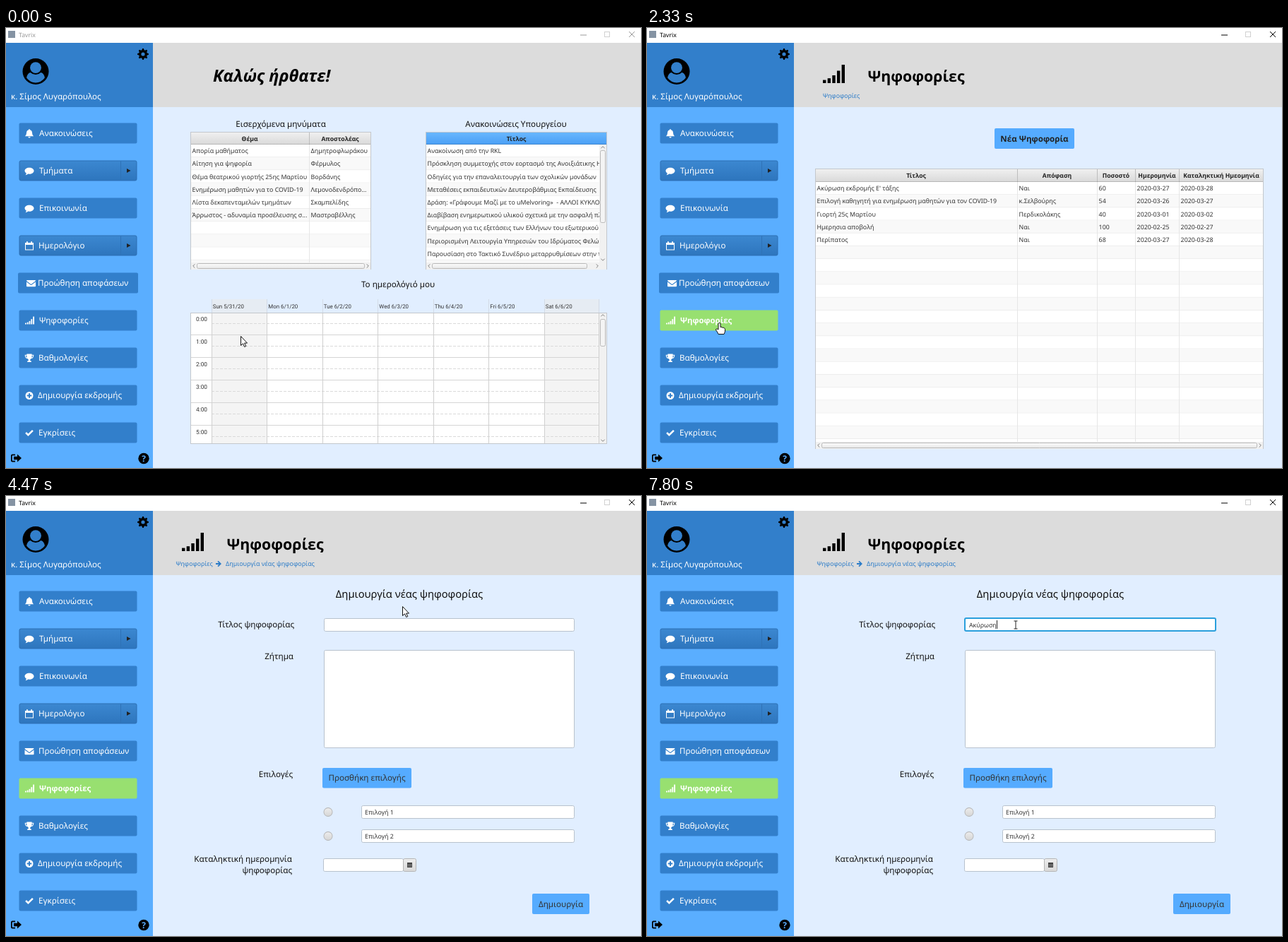
An HTML page with a canvas that plays this animation: 899 by 623 pixels, repeating every 8 s.

```html
<!DOCTYPE html>
<html lang="el">
<head>
<meta charset="utf-8">
<title>Tavrix</title>
<style>
html, body { margin: 0; width: 100%; height: 100%; overflow: hidden; background: #e1eeff; }
canvas { display: block; }
</style>
</head>
<body>
<canvas id="stage" width="899" height="623"></canvas>
<script>
const ctx = document.getElementById('stage').getContext('2d');
const LOOP = 8000, ROW = 18.2;
const BLUE = '#327fcb', SKY = '#5aaeff', PALE = '#e1eeff', SMALL = 8.8, LABEL = 11.6;
const SANS = '"Noto Sans", "Open Sans", sans-serif', ROBOTO = 'Roboto, sans-serif';

const ICONS = {
  bell: 'M0-6.5Q.8-6.5 .8-5.3Q4-4.5 4-1Q4 2.2 6 3.8H-6Q-4 2.2-4-1Q-4-4.5-.8-5.3Q-.8-6.5 0-6.5ZM-1.6 4.5H1.6Q1.4 6 0 6T-1.6 4.5Z',
  chat: 'M0-4.8C3.6-4.8 6.5-2.8 6.5-.3S3.6 4.2 0 4.2Q-.8 4.2-1.6 4.1Q-3.4 5.8-5.5 5.8Q-4.2 4.6-4.2 3.3Q-6.5 2-6.5-.3C-6.5-2.8-3.6-4.8 0-4.8Z',
  calendar: 'M-6-4.5H6V6H-6ZM-5-1.5V5H5V-1.5ZM-4-6.3H-2.2V-4.5H-4ZM2.2-6.3H4V-4.5H2.2Z',
  mail: 'M-6.5-3.6Q-6.5-4.6-5.5-4.6H5.5Q6.5-4.6 6.5-3.6L0 1.4ZM-6.5-1.9L0 2.8L6.5-1.9V4Q6.5 4.8 5.6 4.8H-5.6Q-6.5 4.8-6.5 4Z',
  trophy: 'M-3.6-6H3.6V-4.8H6.3Q6.3 .2 2.6 .6Q1.2 2 1 3.2Q3 3.6 3 5.6H-3Q-3 3.6-1 3.2Q-1.2 2-2.6 .6Q-6.3 .2-6.3-4.8H-3.6ZM-5.2-3.8Q-5-1.3-3.3-.6Q-3.7-2-3.6-3.8ZM5.2-3.8Q5-1.3 3.3-.6Q3.7-2 3.6-3.8Z',
  plus: 'M-5.5 0A5.5 5.5 0 1 1 5.5 0A5.5 5.5 0 1 1-5.5 0ZM-3.3-1V1H-1V3.3H1V1H3.3V-1H1V-3.3H-1V-1Z',
  check: 'M-5.8 .4L-4-1.5L-1.6 .9L4-4.6L5.8-2.8L-1.6 4.6Z',
  exit: 'M-1.5-5.5H-5.5Q-7.5-5.5-7.5-3.5V3.5Q-7.5 5.5-5.5 5.5H-1.5V3.8H-5Q-5.8 3.8-5.8 3V-3Q-5.8-3.8-5-3.8H-1.5ZM1.5-5.5L7.5 0L1.5 5.5V2.3H-3.5V-2.3H1.5Z',
  next: 'M-4-1H.5L-1.6-3L-.3-4.2L4 0L-.3 4.2L-1.6 3L.5 1H-4Z',
  shoulders: 'M12.9 9.1Q12 2.4 7.3 1.4Q4.2 4.6 0 4.6T-7.3 1.4Q-12 2.4-12.9 9.1Q-8 15.9 0 15.9T12.9 9.1Z',
  arrow: 'M0 0V13L3 10.3L5.2 15L7.3 14L5.1 9.6H9Z',
  hand: 'M-1.5 9.5V1.5Q-1.5 0 0 0T1.5 1.5V6Q4 5.6 4.2 6.7Q6.6 6.3 6.8 7.6Q8 7.5 8 9V11.5Q8 13 6.5 16H-1.5Q-2 14-4.7 10.5Q-5.6 9-4.4 8.6Q-3 8.3-1.5 9.5Z'
};
for (const k in ICONS) ICONS[k] = new Path2D(ICONS[k]);

const NAV = [
  ['Ανακοινώσεις', 'bell', 47], ['Τμήματα', 'chat', 47, true], ['Επικοινωνία', 'chat', 47],
  ['Ημερολόγιο', 'calendar', 46, true], ['Προώθηση αποφάσεων', 'mail', 46], ['Ψηφοφορίες', 'bars', 47],
  ['Βαθμολογίες', 'trophy', 46], ['Δημιουργία εκδρομής', 'plus', 45], ['Εγκρίσεις', 'check', 46]
];
const INBOX = [
  ['Απορία μαθήματος', 'Δημητροφλωράκου'], ['Αίτηση για ψηφορία', 'Φέρμυλος'],
  ['Θέμα θεατρικού γιορτής 25ης Μαρτίου', 'Βορδάνης'],
  ['Ενημέρωση μαθητών για το COVID-19', 'Λεμονοδενδρόπο...'],
  ['Λίστα δεκαπενταμελών τμημάτων', 'Σκαμπελίδης'],
  ['Άρρωστος - αδυναμία προσέλευσης σ...', 'Μαστραβέλλης']
];
const NEWS = [
  'Ανακοίνωση από την RKL', 'Πρόσκληση συμμετοχής στον εορτασμό της Ανοιξιάτικης Η.',
  'Οδηγίες για την επαναλειτουργία των σχολικών μονάδων',
  'Μεταθέσεις εκπαιδευτικών Δευτεροβάθμιας Εκπαίδευσης',
  'Δράση: «Γράφουμε Μαζί με το uMelvoring»  - ΑΛΛΟΙ ΚΥΚΛΟΙ',
  'Διαβίβαση ενημερωτικού υλικού σχετικά με την ασφαλή πλοήγηση',
  'Ενημέρωση για τις εξετάσεις των Ελλήνων του εξωτερικού',
  'Περιορισμένη Λειτουργία Υπηρεσιών του Ιδρύματος Φελώ.',
  'Παρουσίαση στο Τακτικό Συνέδριο μεταρρυθμίσεων στην τάξη'
].map(s => [s]);
const VOTES = [
  ['Ακύρωση εκδρομής Ε\' τάξης', 'Ναι', '60', '2020-03-27', '2020-03-28'],
  ['Επιλογή καθηγητή για ενημέρωση μαθητών για τον COVID-19', 'κ.Σελβούρης', '54', '2020-03-26', '2020-03-27'],
  ['Γιορτή 25ς Μαρτίου', 'Περδικολάκης', '40', '2020-03-01', '2020-03-02'],
  ['Ημερησια αποβολή', 'Ναι', '100', '2020-02-25', '2020-02-27'],
  ['Περίπατος', 'Ναι', '68', '2020-03-27', '2020-03-28']
];
const DAYS = ['Sun 5/31/20', 'Mon 6/1/20', 'Tue 6/2/20', 'Wed 6/3/20', 'Thu 6/4/20', 'Fri 6/5/20', 'Sat 6/6/20'];

// start, end, steps, then from / control / to points
const MOVES = [
  [60, 470, 6, 332, 436, 190, 365, 102, 425],
  [710, 810, 2, 102, 425, 102, 421, 102, 417],
  [2640, 3270, 9, 102, 417, 725, 150, 561, 161],
  [3440, 3530, 2, 561, 161, 561, 158, 561, 156],
  [4850, 5020, 3, 561, 156, 540, 166, 522, 179],
  [5170, 5250, 2, 522, 179, 522, 181, 522, 182]
];
const KEYS = [6400, 6790, 7190, 7410, 7560, 7720, 7800];

function rect(x, y, w, h, fill) {
  ctx.fillStyle = fill;
  ctx.fillRect(x, y, w, h);
}
function box(x, y, w, h, fill, line, r = 2, lw = 1) {
  ctx.beginPath();
  ctx.roundRect(x, y, w, h, r);
  ctx.fillStyle = fill;
  ctx.fill();
  if (line) {
    ctx.strokeStyle = line;
    ctx.lineWidth = lw;
    ctx.stroke();
  }
}
function disc(x, y, r, fill) {
  ctx.beginPath();
  ctx.arc(x, y, r, 0, 7);
  ctx.fillStyle = fill;
  ctx.fill();
}
function line(pts, color, w = 1) {
  ctx.beginPath();
  for (let i = 0; i < pts.length; i += 2) ctx.lineTo(pts[i], pts[i + 1]);
  ctx.strokeStyle = color;
  ctx.lineWidth = w;
  ctx.stroke();
}
function grad(y, h, a, b) {
  const g = ctx.createLinearGradient(0, y, 0, y + h);
  g.addColorStop(0, a);
  g.addColorStop(1, b);
  return g;
}
function text(s, x, y, size, color = '#111', align = 'left', style = '', font = SANS) {
  ctx.font = `${style} ${size}px ${font}`;
  ctx.textAlign = align;
  ctx.fillStyle = color;
  ctx.fillText(s, x, y + size * 0.36);
}
function icon(name, x, y, fill, outline) {
  ctx.save();
  ctx.translate(x, y);
  ctx.fillStyle = fill;
  ctx.fill(ICONS[name], 'evenodd');
  if (outline) {
    ctx.strokeStyle = outline;
    ctx.lineWidth = 1;
    ctx.stroke(ICONS[name]);
  }
  ctx.restore();
}
function bars(x, base, k, color) {
  [4.4, 6.8, 11, 17.5, 26].forEach((h, i) => rect(x + i * 6.65 * k, base - h * k, 4.4 * k, h * k, color));
}
function gear(x, y) {
  ctx.beginPath();
  for (let i = 0; i < 32; i++) {
    const a = (i - 1.5) * Math.PI / 16, r = i % 4 === 1 || i % 4 === 2 ? 8 : 5.9;
    ctx.lineTo(x + r * Math.cos(a), y + r * Math.sin(a));
  }
  ctx.closePath();
  ctx.fillStyle = '#000';
  ctx.fill();
  disc(x, y, 2.6, BLUE);
}

function chevron(x, y, dx, dy) {
  const k = 2.6;
  line([x - dx * 1.3 + dy * k, y - dy * 1.3 + dx * k, x + dx * 1.3, y + dy * 1.3,
    x - dx * 1.3 - dy * k, y - dy * 1.3 - dx * k], '#777', 0.9);
}
function hbar(x, y, w, from, to, end = x + w - 4) {
  rect(x, y, w, 10, '#f1f1f1');
  chevron(x + 4, y + 5, -1, 0);
  chevron(end, y + 5, 1, 0);
  box(from + .5, y + 1.5, to - from - 1, 7, grad(y + 1, 8, '#fdfdfd', '#e6e6e6'), '#b9b9b9');
}
function vbar(x, y, h, from, to) {
  rect(x, y, 10, h, '#f1f1f1');
  chevron(x + 5, y + 4, 0, -1);
  chevron(x + 5, y + h - 4, 0, 1);
  box(x + 1.5, from + .5, 7, to - from - 1, '#f4f4f4', '#b9b9b9');
}
function table(x, y, w, h, head, cols, titles, rows, top = ['#f1f1f1', '#d9d9d9']) {
  const bottom = y + h - 10, ends = [...cols.slice(1), x + w];
  rect(x, y, w, h, '#fff');
  ctx.save();
  ctx.beginPath();
  ctx.rect(x, y, w, h - 10);
  ctx.clip();
  for (let i = 0, ry = y + head; ry < bottom; i++, ry += ROW) {
    rect(x, ry, w, ROW, i % 2 ? '#f9f9f9' : '#fff');
    rect(x, ry + ROW - 1, w, 1, '#ededed');
  }
  rect(x, y, w, head, grad(y, head, ...top));
  cols.slice(1).forEach(c => {
    rect(c, y + head, 1, h, '#e6e6e6');
    rect(c, y, 1, head, '#bdbdbd');
  });
  rect(x, y + head - 1, w, 1, 'rgba(0,0,0,.16)');
  titles.forEach((s, i) => text(s, (cols[i] + ends[i]) / 2, y + head / 2 + .5, 8.65, '#222', 'center', 'bold'));
  rows.forEach((r, j) => r.forEach((s, i) => text(s, cols[i] + 2.6, y + head + 9 + j * ROW, SMALL, '#333')));
  ctx.restore();
  ctx.strokeStyle = '#c3c7cc';
  ctx.lineWidth = 1;
  ctx.strokeRect(x + .5, y + .5, w - 1, h - 1);
}

function titleBar(active) {
  const c = active ? '#000' : '#999';
  rect(0, 0, 899, 21, '#fff');
  rect(3, 4, 10, 10, '#8593a3');
  text('Tavrix', 18, 9.5, 8.7, c);
  line([813, 10, 822, 10], c);
  ctx.strokeStyle = '#d0d0d0';
  ctx.strokeRect(847.5, 5.5, 7, 7);
  line([882, 5, 890, 13], c);
  line([890, 5, 882, 13], c);
}
function sidebar(page, pressed) {
  rect(0, 21, 208, 602, SKY);
  rect(0, 21, 208, 91, BLUE);
  disc(42, 61.5, 18.5, '#000');
  disc(42, 56.2, 7.9, BLUE);
  icon('shoulders', 42, 61.5, BLUE);
  gear(194, 37);
  text('κ. Σίμος Λυγαρόπουλος', 7, 97, LABEL, '#fff');

  NAV.forEach(([label, pic, tx, menu], i) => {
    const y = 134.5 + i * 53, mid = y + 14.5, on = page > 0 && i === 5;
    const wide = i === 4 && page < 2;
    const fill = on ? '#98e070' : pressed && i === 5 ? '#2d72b7' : BLUE;
    if (menu) {
      box(19, y + .5, 166, 28, grad(y, 29, '#3c88d1', '#2d75bd'), '#2c6fb3');
      rect(162, y + 1, 1, 27, '#2f72b6');
      ctx.beginPath();
      ctx.moveTo(171, mid - 3);
      ctx.lineTo(176.5, mid);
      ctx.lineTo(171, mid + 3);
      ctx.fillStyle = '#222';
      ctx.fill();
    } else box(wide ? 17 : 18.5, y, wide ? 170 : 167, 29, fill);
    if (pic === 'bars') bars(27, 419.5, .42, '#fff');
    else icon(pic, wide ? 35.5 : 33, mid + .5, '#fff');
    text(label, wide ? 45 : tx, mid, on ? 11.4 : LABEL, '#fff', 'left', on ? 'bold' : '');
  });
  const lift = page === 2 ? 2 : 0;
  icon('exit', 14.5, 609 - lift, '#000');
  disc(195, 609.5 - lift, 7.7, '#000');
  text('?', 195, 609.7 - lift, 12, SKY, 'center', 'bold');
}

function homePage() {
  text('Καλώς ήρθατε!', 293, 68, 23.6, '#000', 'left', 'italic bold');
  text('Εισερχόμενα μηνύματα', 389, 136, LABEL, '#111', 'center');
  text('Ανακοινώσεις Υπουργείου', 722, 136, LABEL, '#111', 'center');
  text('Το ημερολόγιό μου', 555, 363, LABEL, '#111', 'center');
  table(261, 147, 256, 195, 18, [261, 429], ['Θέμα', 'Αποστολέας'], INBOX);
  hbar(262, 332, 254, 270, 508);
  table(594, 147, 257, 195, 18, [594], ['Τίτλος'], NEWS, ['#6ab8ff', '#4a9ff5']);
  vbar(840, 165, 167, 173, 276);
  hbar(595, 332, 255, 603, 823, 837);
  calendar();
}
function calendar() {
  const left = 291, step = 78.5, top = 403;
  rect(261, top, 590, 186, '#fff');
  DAYS.forEach((d, i) => {
    const x = left + i * step;
    if (i % 6 === 0) {
      rect(x, 384, step, 19, '#e6ecf3');
      rect(x, top, step, 186, '#f4f4f4');
    }
    text(d, x + 1.8, 394, 7.9, '#333', 'left', '', ROBOTO);
  });
  for (let h = 0; h < 6; h++) {
    const y = top + h * 32;
    if (h) rect(261, y - 1, 579, 1, '#d5d5d5');
    ctx.setLineDash([4, 2]);
    line([left, y + 15.5, 840, y + 15.5], '#dadada');
    ctx.setLineDash([]);
    text(h + ':00', 285, y + 9, 8.3, '#333', 'right', '', ROBOTO);
  }
  for (let i = 0; i < 8; i++) {
    const x = Math.floor(left + i * step) - (i === 7 ? 1 : 0);
    rect(x, 384, 1, 19, '#d3dbe6');
    rect(x, top, 1, 186, '#cfcfcf');
  }
  vbar(840, top, 185, 412, 451);
  ctx.strokeStyle = '#c3c7cc';
  ctx.lineWidth = 1;
  ctx.strokeRect(261.5, top + .5, 589, 185);
}
function pageHead() {
  bars(249, 78, 1, '#000');
  text('Ψηφοφορίες', 312.5, 68, 21.3, '#000', 'left', 'bold');
}
function votesPage(pressed) {
  pageHead();
  text('Ψηφοφορίες', 249, 95.5, 8.7, '#2a7bc8');
  box(492, 142, 113, 29, pressed ? '#4c9ce9' : '#55abff');
  text('Νέα Ψηφοφορία', 548.5, 157, 11.6, '#222', 'center', 'bold');
  table(238, 199, 635, 397, 19, [238, 524, 637, 691, 753],
    ['Τίτλος', 'Απόφαση', 'Ποσοστό', 'Ημερομηνία', 'Καταληκτική Ημεομηνία'], VOTES);
  hbar(239, 586, 633, 247, 864);
}
function field(x, y, w, h) {
  box(x + .5, y + .5, w - 1, h - 1, '#fff', '#b8c2cd', 2);
}
function formPage(t) {
  pageHead();
  text('Ψηφοφορίες', 240.5, 95.5, 8.7, '#2a7bc8');
  icon('next', 301, 96, '#2a7bc8');
  text('Δημιουργία νέας ψηφοφορίας', 311, 95.5, 8.9, '#2a7bc8');
  text('Δημιουργία νέας ψηφοφορίας', 571, 139, 14.7, '#111', 'center');
  [['Τίτλος ψηφοφορίας', 408, 182], ['Ζήτημα', 407, 227], ['Επιλογές', 406, 394],
    ['Καταληκτική ημερομηνία', 405, 513.5], ['ψηφοφορίας', 405, 529.5]
  ].forEach(([s, x, y]) => text(s, x, y, LABEL, '#111', 'right'));

  if (t >= 5480) {
    box(450, 173, 355, 18, '#fff', '#2a9fdc', 2, 2);
    const word = 'Ακύρωση'.slice(0, KEYS.filter(k => t >= k).length);
    text(word, 456, 182.5, SMALL, '#333');
    rect(Math.round(456 + ctx.measureText(word).width), 176, 1, 12, '#222');
  } else field(450, 173, 355, 19);
  field(450, 218, 355, 139);
  box(448, 385, 126, 28.5, '#55abff');
  text('Προσθήκη επιλογής', 511, 399, LABEL, '#333', 'center');
  [447, 481].forEach((y, i) => {
    disc(456, y + .5, 6.5, '#b3b3b3');
    disc(456, y + .5, 5.6, grad(y - 5, 11, '#ececec', '#d6d6d6'));
    field(503, y - 9, 302, 19);
    text('Επιλογή ' + (i + 1), 508, y + .5, SMALL, '#333');
  });
  field(449, 513, 114, 19);
  box(562.5, 513.5, 18, 18, grad(513, 19, '#eee', '#d8d8d8'), '#b5b5b5');
  rect(568, 519, 7, 7, '#444');
  for (let i = 0; i < 6; i++) rect(569 + i % 3 * 2, 521.5 + (i > 2 ? 2 : 0), 1, 1, '#ccc');
  box(745, 563, 81, 29, '#55abff');
  text('Δημιουργία', 785.5, 577.5, LABEL, '#333', 'center');
}

function pointerAt(t) {
  let pos = [332, 436];
  for (const [a, b, n, x0, y0, cx, cy, x1, y1] of MOVES) {
    if (t < a) break;
    const s = Math.min(1, (Math.floor((t - a) / (b - a) * (n - 1) + 1e-6) + 1) / n);
    const p = s * s * (3 - 2 * s), q = 1 - p;
    pos = [q * q * x0 + 2 * p * q * cx + p * p * x1, q * q * y0 + 2 * p * q * cy + p * p * y1];
  }
  return pos.map(Math.round);
}
function pointer(t, page) {
  const [x, y] = pointerAt(t);
  const onNav = x >= 19 && x < 185 && y >= 135 && (y - 135) % 53 < 29;
  const onNew = page === 1 && t < 4300 && x >= 492 && x < 605 && y >= 142 && y < 171;
  if (page === 2 && y > 172) {
    line([x, y - 5, x, y + 6], '#222');
    line([x - 2.5, y - 5, x + 2.5, y - 5], '#222');
    line([x - 2.5, y + 6, x + 2.5, y + 6], '#222');
  } else icon(onNav || onNew ? 'hand' : 'arrow', x + .5, y + .5, '#fff', '#111');
}

function draw() {
  const t = performance.now() % LOOP;
  const page = t < 2330 ? 0 : t < 4470 ? 1 : 2;
  ctx.textRendering = 'geometricPrecision';
  rect(0, 0, 899, 623, PALE);
  rect(208, 21, 691, 91, '#dcdcdc');
  titleBar(t >= 1720);
  sidebar(page, t >= 1720 && t < 1790);
  if (page === 0) homePage();
  else if (page === 1) votesPage(t >= 3830 && t < 3910);
  else formPage(t);
  pointer(t, page);
  requestAnimationFrame(draw);
}
draw();
</script>
</body>
</html>
```
